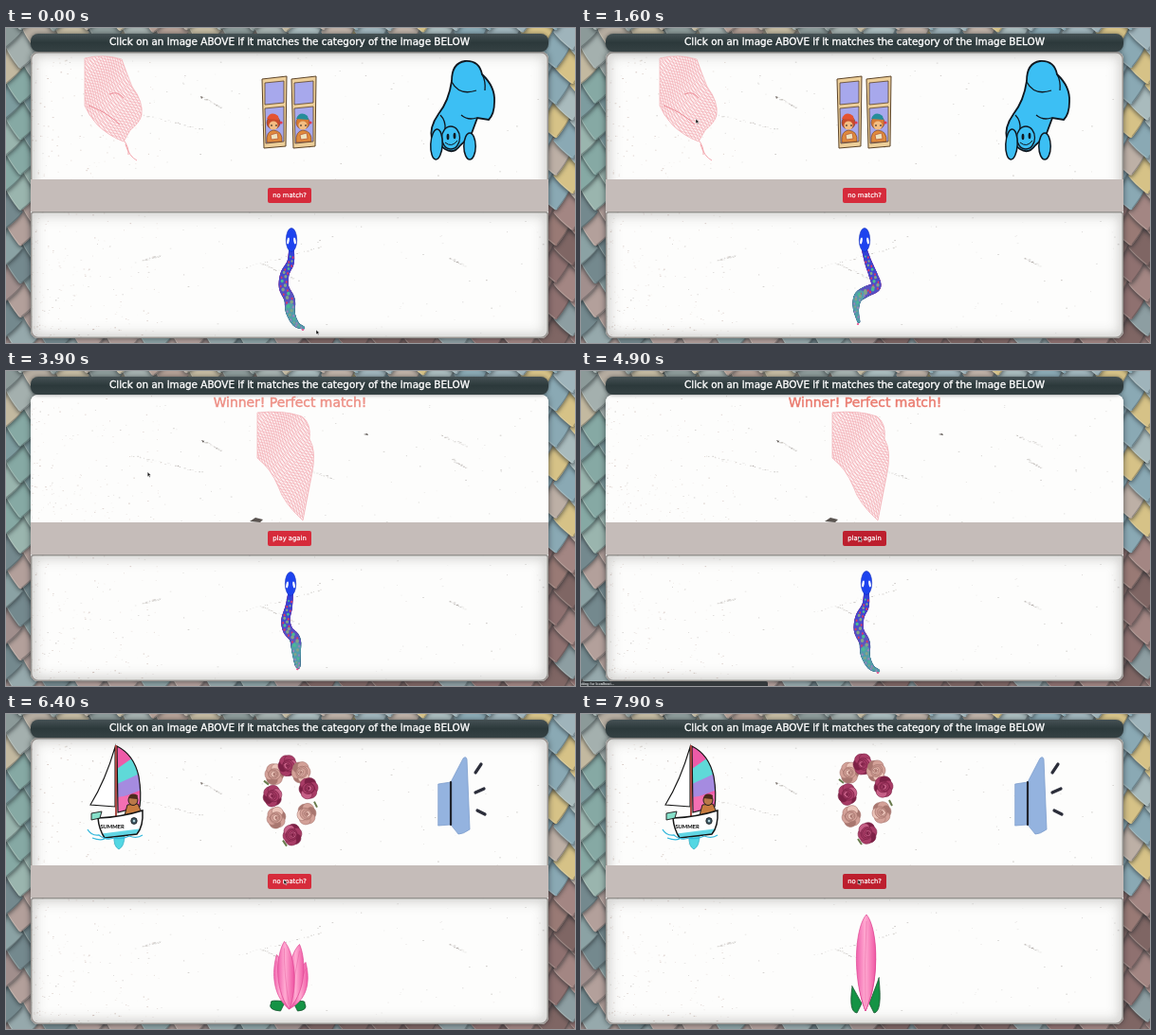
These frames come from a looping animation (600x333 px, 8000 ms). An HTML page with a canvas:

```html
<!DOCTYPE html>
<html lang="en">
<head>
<meta charset="utf-8">
<title>Matching game</title>
<style>
html, body { margin: 0; width: 100%; height: 100%; overflow: hidden; background: #8b9698; }
canvas { display: block; width: 600px; height: 333px; }
</style>
</head>
<body>
<canvas id="stage" width="600" height="333"></canvas>
<script>
const LOOP = 8000, WIN = 2000, LOAD = 5150;
const stage = document.getElementById('stage').getContext('2d');
let c = stage;

const lerp = (a, b, k) => a + (b - a) * k;
const mix = (a, b, k) => a.map((v, i) => lerp(v, b[i], k));

// Interpolates rows of [time, ...values].
function track(t, rows) {
  if (t <= rows[0][0]) return rows[0].slice(1);
  for (let i = 1; i < rows.length; i++) {
    const a = rows[i - 1], b = rows[i];
    if (t <= b[0]) return mix(a, b, (t - a[0]) / (b[0] - a[0])).slice(1);
  }
  return rows[rows.length - 1].slice(1);
}

function seeded(s) {
  return () => (s = (s * 16807) % 2147483647) / 2147483647;
}

// Entrance from far away with a damped overshoot; returns the offset.
function bounceIn(t, start) {
  const p = (t - start) / 1000;
  const stops = [[0, -3000], [.6, 25], [.75, -10], [.9, 5], [1, 0]];
  if (p <= 0) return -3000;
  for (let i = 1; i < stops.length; i++) {
    const [p0, a] = stops[i - 1], [p1, b] = stops[i];
    if (p <= p1) return lerp(a, b, 1 - (1 - (p - p0) / (p1 - p0)) ** 3);
  }
  return 0;
}

function draw(d, fill, stroke, width = 1) {
  const p = d instanceof Path2D ? d : new Path2D(d);
  if (fill) { c.fillStyle = fill; c.fill(p); }
  if (stroke) { c.strokeStyle = stroke; c.lineWidth = width; c.stroke(p); }
}

function oval(x, y, rx, ry, fill, stroke, width, turn = 0) {
  const p = new Path2D();
  p.ellipse(x, y, rx, ry, turn, 0, 7);
  draw(p, fill, stroke, width);
}

function box(x, y, w, h, r) {
  const p = new Path2D();
  p.roundRect(x, y, w, h, r);
  return p;
}

// The hairline stroke gives the text a medium weight.
function label(text, x, y, size, color, font = '"DejaVu Sans", sans-serif', align = 'center') {
  c.font = size + 'px ' + font;
  c.textAlign = align;
  c.textBaseline = 'middle';
  c.fillStyle = c.strokeStyle = color;
  c.lineWidth = size * .035;
  c.fillText(text, x, y);
  c.strokeText(text, x, y);
}

function shifted(x, y, paint) {
  c.save();
  c.translate(x, y);
  paint();
  c.restore();
}

function shingles() {
  const rnd = seeded(77);
  const sand = ['#b5aca0', '#8c9a99', '#c3b9a0', '#a4b0ae', '#b39f95'];
  const teal = ['#86a9a4', '#9ab5ae', '#c4bf9f', '#7d9c9f', '#a9b3a6'];
  const mauve = ['#a18f8d', '#8ba2a4', '#b3a09b', '#74898e', '#96a9ac'];
  const sky = ['#9fb4bb', '#8aa9b4', '#d6c287', '#a9bbbd', '#bdb0a6'];
  const brick = ['#8f7170', '#a38683', '#7f6664', '#8d9ea2', '#997a75'];
  for (let row = 20; row >= -1; row--) {
    for (let col = -1; col < 19; col++) {
      const x = col * 35 + (row % 2 ? 17.5 : 0), y = row * 19 + rnd() * 3;
      const tones = x < 300 ? (y < 50 ? sand : y < 190 ? teal : mauve) : y < 190 ? sky : brick;
      c.save();
      c.translate(x, y);
      c.rotate(x < 300 ? .12 : -.12);
      c.shadowColor = 'rgba(30,36,40,.6)';
      c.shadowBlur = 4;
      c.shadowOffsetY = 2;
      draw('M-18 0L0-22L18 0Q13 9 2 20Q0 22-2 20Q-13 9-18 0Z', tones[rnd() * 5 | 0]);
      c.shadowColor = 'transparent';
      draw('M-17 1Q-12 9-1 20', null, 'rgba(235,235,225,.25)', 1);
      draw('M17 1Q12 9 1 20', null, 'rgba(50,55,58,.35)', 1);
      c.restore();
    }
  }
}

function scuffs(x, y, w, h, seed, count) {
  const rnd = seeded(seed);
  for (let i = 0; i < count; i++) {
    const worn = rnd() < .6;
    const px = x + (worn ? rnd() ** 2 * .25 : rnd()) * w;
    const py = y + (worn ? 1 - rnd() ** 1.6 : rnd()) * h;
    c.fillStyle = `rgba(${worn ? '160,125,112' : '120,112,106'},${.1 + rnd() * .35})`;
    c.fillRect(px, py, .4 + rnd() * 1.4, .3 + rnd() * .7);
  }
}

// A broken scratch: short dashes scattered along a line.
function scratch(x, y, dx, dy) {
  const rnd = seeded(Math.round(x * 7 + y));
  for (let k = 0; k < 1; k += .04) {
    c.fillStyle = `rgba(115,106,100,${rnd() * .55})`;
    c.fillRect(x + dx * k + rnd() * 2, y + dy * k + rnd() * 2 - 1, .6 + rnd() * 1.8, .7);
  }
}

function panel(shape, paint, inset) {
  c.save();
  draw(shape, '#fdfdfc');
  c.clip(shape);
  paint();
  if (inset) {
    c.shadowColor = 'rgba(80,76,72,.85)';
    c.shadowBlur = 14;
    draw(shape, null, 'rgba(140,136,132,.75)', 3);
    c.shadowBlur = 8;
    draw(shape, null, 'rgba(140,136,132,.4)', 2);
  }
  c.restore();
}

function backdrop(won) {
  const canvas = document.createElement('canvas');
  canvas.width = 600;
  canvas.height = 333;
  c = canvas.getContext('2d');
  shingles();
  c.save();
  c.shadowColor = 'rgba(30,35,38,.6)';
  c.shadowBlur = 6;
  draw(box(26, 25, 546, 303, 8), '#fdfdfc');
  c.restore();
  panel(box(26, 25, 546, 172, 8), () => {
    scuffs(26, 25, 546, 168, won ? 51 : 23, won ? 420 : 340);
    scratch(127, 88, 82, 20);
    scratch(206, 73, 20, 12);
    scratch(468, 93, 17, 10);
    if (won) {
      scratch(455, 66, 30, 14);
      scratch(310, 102, 34, 12);
      draw('M257 159L263 155L271 157L268 160ZM206 73l3 1l-1 2zM377 67l4-1l1 2z', '#5a5450');
    } else {
      draw('M205 72l3 1l-2 2zM150 81l3 1z', '#7c746e');
    }
  }, !won);
  draw('M26 160H572V194H26Z', 'rgb(197,188,185)');
  panel(box(26, 194, 546, 134, [3, 3, 8, 8]), () => {
    scuffs(26, 194, 546, 134, 91, 320);
    scratch(142, 246, 20, -6);
    scratch(240, 256, 95, -26);
    scratch(268, 248, 36, 18);
    scratch(466, 243, 17, 8);
  }, true);
  c = stage;
  return canvas;
}

const plain = backdrop(false), prize = backdrop(true);

function header(dy) {
  const fill = c.createLinearGradient(0, 6 + dy, 0, 25 + dy);
  fill.addColorStop(0, '#455154');
  fill.addColorStop(.5, '#2c393b');
  fill.addColorStop(1, '#354143');
  c.save();
  c.shadowColor = 'rgba(20,25,28,.5)';
  c.shadowBlur = 4;
  draw(box(26, 6 + dy, 546, 19, 8), fill);
  c.restore();
  label('Click on an image ABOVE if it matches the category of the image BELOW', 299, 15.6 + dy, 10.4, '#fff');
}

function button(text, hover) {
  draw(box(276, 169, 46, 16, 2), hover ? '#bd1f2e' : '#d62b3b');
  label(text, 299, 177.3, 6.8, '#fff');
}

const serpentA = new Path2D('M83 32Q103 27 122 33Q128 50 133 62Q145 78 143 92Q141 100 131 108L124 120Q108 114 96 102Q87 92 83 82Z');
const serpentB = new Path2D('M265 44Q292 41 312 48Q322 55 320 72Q328 84 322 112L313 158Q293 140 287 122Q280 104 265 92Z');

function serpent(shape, x, y) {
  c.save();
  draw(shape, '#fdeeef', '#f2b0b7', .7);
  c.clip(shape);
  for (let i = -22; i < 42; i++) {
    const a = new Path2D(), b = new Path2D();
    for (let j = 0; j <= 24; j++) {
      const wave = Math.sin(j * .45 + i * .25) * 2.5;
      a.lineTo(x + i * 3 + j * 2.2 + wave, y + j * 5);
      b.lineTo(x + j * 3, y + i * 3.4 + j * 1.6 + wave);
    }
    draw(a, null, '#f1a7af', .7);
    draw(b, null, '#f3b0b7', .7);
  }
  c.restore();
}

function pinkHead() {
  draw('M123 117Q130 126 129 134M126 123Q130 136 138 140', null, '#f3a6ad', 1);
  serpent(serpentA, 83, 30);
  draw('M87 82Q105 88 120 102M109 70Q118 66 124 74', null, '#ec8f9a', 1);
}

function shutter(x, hair, cap) {
  shifted(x, 51, () => {
    draw('M0 3L26 0L25 74L2 76Z', '#edcf9a', '#5c4327', 1);
    draw('M3 7L23 5V28L3 30Z', '#a7a8ec', '#5c4327', .8);
    draw('M3 34L23 32V69L4 71Z', '#a7a8ec', '#5c4327', .8);
    draw('M5 70Q4 58 12 57Q22 58 21 69Z', '#df8a3d', '#6d3a1c', .6);
    oval(12, 49, 7, 7, hair, '#6d3a1c', .6);
    oval(12, 52, 4.6, 4.5, '#f3bd83');
    draw('M5 45Q9 36 17 42L18 46Z', cap);
    oval(10, 52, .7, 1, '#222');
    oval(15, 52, .7, 1, '#222');
    draw('M9 62L16 60L17 66L10 67Z', '#eee3bf', '#b5502d', .7);
    oval(20, 49, 1.6, 1.6, '#df3c51');
  });
}

function blueBeast() {
  const blue = '#3cbff4', ink = '#101820';
  draw('M470 56Q470 37 484 35Q499 34 502 49Q516 62 515 78Q515 91 509 97L497 95L490 114L479 124Q472 134 463 128L449 118Q446 105 456 91Q467 77 470 56Z', blue, ink, 1.8);
  draw('M470 57Q478 72 496 66M502 49Q506 56 505 66M480 92Q487 98 496 95M458 92Q464 98 463 108', null, ink, 1.3);
  oval(469, 116, 9.5, 12, blue, ink, 1.3);
  oval(454, 123, 6.2, 16, blue, ink, 1.5, .05);
  oval(489, 125, 6.2, 14, blue, ink, 1.5);
  oval(466, 115, 1.4, 3.2, ink);
  oval(473, 114, 1.4, 3.2, ink);
  draw('M463 121Q470 127 476 119', null, ink, 1);
}

function boat() {
  const ink = '#151515';
  draw('M114 128L125 128Q125 140 119 143Q113 140 114 128Z', '#53d7e3', '#2aa8c0', .7);
  draw('M115 35Q105 70 89 96L115 98Z', '#fff', ink, 1.1);
  const sail = new Path2D('M117 34Q135 43 140 66Q143 84 141 98L118 104Z');
  draw(sail, '#ee5ba8');
  c.save();
  c.clip(sail);
  draw('M117 58L134 46L143 62L117 76Z', '#5fd9d8');
  draw('M117 74L143 62V80L117 90Z', '#a58be0');
  draw('M117 88L143 84V92L117 104Z', '#f46fb2');
  c.restore();
  draw(sail, null, ink, 1.2);
  draw('M116 33V108', null, '#a63b35', 1.8);
  draw('M125 107L128 96L139 95L143 104Z', '#c87c3f', ink, .9);
  oval(134, 91, 5, 5.5, '#b97948', ink, .9);
  draw('M129 89Q131 82 139 86L138 90Z', '#4c2b1b');
  const hull = new Path2D('M97 110Q122 109 144 102Q145 119 138 127L104 131Q98 122 97 110Z');
  draw(hull, '#fff');
  c.save();
  c.clip(hull);
  draw('M96 127L145 121V134H96Z', '#62d6e4');
  c.restore();
  draw(hull, null, ink, 1.5);
  draw('M90 105L101 103L99 110L90 112Z', '#86dfc9', ink, .9);
  label('SUMMER', 112, 119.5, 5.8, '#111', 'Lato, sans-serif');
  oval(135, 113, 3.2, 3.4, '#415b68', ink, .8);
  oval(135, 113, 1.2, 1.2, '#b9d7dd');
  draw('M86 122Q90 129 98 128Q105 134 114 131Q122 133 130 129Q138 132 144 128M91 131Q99 134 104 132', null, '#35b8dc', 1.3);
}

function rose(x, y, dark, i) {
  const tones = dark ? ['#7c2146', '#a83c66', '#c65f86'] : ['#a8766f', '#d3a198', '#ecc5ba'];
  for (let k = 0; k < 6; k++) {
    const a = k * 1.05 + i;
    oval(x + Math.cos(a) * 5, y + Math.sin(a) * 6.5, 5, 6, tones[k % 2 + (k > 3)], tones[0], .6, a);
  }
  for (let r = 6.5; r > 1; r -= 1.5) {
    oval(x + Math.sin(r + i), y, r, r * .9, tones[r * 2 % 4 > 2 ? 2 : 1], tones[0], .8, i);
  }
  oval(x, y, 1.2, 1, tones[0]);
}

function wreath() {
  const spots = [[283, 62], [297, 53], [311, 60], [319, 77], [317, 104], [302, 126], [285, 108], [281, 85]];
  draw('M272 69L277 73M325 91L328 97M292 132L296 138', null, '#697b4d', 2);
  spots.forEach(([x, y], i) => rose(x, y, i % 2, i));
}

function horn() {
  c.lineCap = 'round';
  draw('M458 74L471 72L484 47Q487 44 488 48L491 122Q484 127 479 127L471 117L458 118Z', '#94b3df', '#7f9fcd', .8);
  draw('M471 72V117', null, '#20232d', 2.2);
  draw('M497 62L503 53M497 83L506 79M499 102L507 106', null, '#2c2e3a', 3.2);
  c.lineCap = 'butt';
}

// Spine points from neck to tail tip.
const poses = [
  [0, 301, 235, 300, 248, 294, 260, 293, 274, 299, 287, 300, 301, 306, 313, 314, 317],
  [1600, 299, 235, 303, 248, 308, 261, 311, 273, 300, 279, 292, 285, 290, 297, 293, 311],
  [2800, 299, 237, 296, 252, 296, 266, 302, 274, 311, 279, 313, 293, 309, 306, 302, 309],
  [4900, 301, 235, 300, 248, 294, 260, 293, 274, 299, 287, 300, 301, 306, 313, 314, 317]
];

function snake(t) {
  const v = track(t, poses);
  const at = i => { i = Math.max(0, Math.min(7, i)); return [v[i * 2], v[i * 2 + 1]]; };
  const spine = k => {
    const i = Math.min(6, Math.floor(k * 7)), f = k * 7 - i;
    const [a, b, d, e] = [at(i - 1), at(i), at(i + 1), at(i + 2)];
    return [0, 1].map(n => b[n] + .5 * f * (d[n] - a[n] + f * (2 * a[n] - 5 * b[n] + 4 * d[n] - e[n] + f * (3 * (b[n] - d[n]) + e[n] - a[n]))));
  };
  const girth = k => (2.3 + 2.9 * Math.sin(Math.min(1, k * 1.5) * Math.PI / 2)) * Math.min(1, (1.08 - k) * 2.2);
  const coat = k => `rgb(${mix([46, 63, 218], k < .65 ? [98, 86, 190] : [84, 157, 170], Math.min(1, k * 1.5)).map(Math.round)})`;
  for (let k = 0; k <= 1; k += .008) oval(...spine(k), girth(k) + .5, girth(k) + .5, k < .55 ? '#733da6' : '#3f7190');
  for (let k = 0; k <= 1; k += .008) oval(...spine(k), girth(k), girth(k), coat(k));
  for (let i = 0; i < 19; i++) {
    const k = .08 + i * .047, [x, y] = spine(k), g = girth(k), side = i % 2 ? 1 : -1;
    oval(x + side * g * .35, y, g * .35, g * .4, i % 3 ? '#83a488' : '#4abb92');
    oval(x - side * g * .65, y + 1, .9, 1.3, k < .6 ? '#df3762' : '#9d82bd');
  }
  const [tx, ty] = spine(1);
  oval(tx - 1, ty + 2, 1.2, 1, '#e9508f');
  const [hx, hy] = at(0);
  oval(hx, hy - 11, 5.7, 12.5, '#1d43ef', '#152fba', .6);
  oval(hx - 3.5, hy - 10, 1.2, 3.5, '#fff', null, 0, .15);
  oval(hx + 3.5, hy - 10, 1.2, 3.5, '#fff', null, 0, -.15);
}

// Each petal row is tip x, tip y and half width; the last six values place base and leaves.
const blooms = [
  [5900, 286, 261, 7, 315, 263, 7, 307, 249, 8, 296, 247, 9, 299, 307, 281, 298, 314, 303],
  [6900, 285, 248, 7, 317, 262, 8, 312, 238, 8, 291, 234, 8, 298, 317, 278, 313, 316, 309],
  [7900, 300, 222, 8, 302, 224, 9, 302, 215, 9, 301, 212, 10, 300, 314, 286, 288, 314, 279]
];

function flower(t) {
  const v = track(t, blooms), [bx, by, lx, ly, rx, ry] = v.slice(12);
  for (const [x, y, s] of [[lx, ly, -1], [rx, ry, 1]]) {
    draw(`M${bx + s * 4} ${by - 8}Q${x + s * 2} ${y - 4} ${x} ${y}Q${x + s * 4} ${by + 1} ${bx + s * 9} ${by + 2}Z`, '#159345', '#17532f', .8);
  }
  for (let i = 0; i < 12; i += 3) {
    const [x, y, w] = v.slice(i, i + 3), mid = lerp(y, by, .5), cx = lerp(x, bx, .3);
    const fill = c.createLinearGradient(cx - w, 0, cx + w, 0);
    fill.addColorStop(0, '#f062ad');
    fill.addColorStop(.45, '#ffaad1');
    fill.addColorStop(1, '#f058a5');
    draw(`M${bx} ${by}C${cx - w * 1.6} ${mid + 12} ${cx - w * 1.1} ${y + 12} ${x} ${y}C${cx + w * 1.1} ${y + 12} ${cx + w * 1.6} ${mid + 12} ${bx} ${by}Z`, fill, '#de4793', .7);
    draw(`M${x} ${y + 7}Q${cx - 2} ${mid} ${bx} ${by - 5}`, null, 'rgba(210,48,129,.35)', .8);
  }
}

const cursorPath = [
  [0, 327, 319], [300, 327, 319], [1400, 121, 96], [1800, 121, 96], [2600, 131, 98],
  [3800, 131, 98], [4700, 293, 175], [7000, 293, 175], [7800, 292, 175]
];

function cursor(t) {
  const [x, y] = track(t, cursorPath);
  shifted(x, y, () => draw('M0 0V5L1.2 4L2.1 5.8L3 5.3L2.2 3.6H3.8Z', '#111', '#fff', .5));
}

function frame(now) {
  const t = now % LOOP, won = t >= WIN && t < LOAD;
  c.drawImage(won ? prize : plain, 0, 0);
  header(t >= LOAD ? bounceIn(t, LOAD) : 0);
  if (t < WIN) {
    pinkHead();
    shutter(270, '#c94c2b', '#e45332');
    shutter(301, '#d67b35', '#268d9a');
    blueBeast();
  } else if (won) {
    c.globalAlpha = track(t, [[2000, .45], [2800, .55], [4900, 1]])[0];
    label('Winner! Perfect match!', 299.5, 34, 13.9, '#ea7c70');
    c.globalAlpha = 1;
    serpent(serpentB, 265, 42);
  } else {
    shifted(bounceIn(t, 5270), 0, boat);
    shifted(0, bounceIn(t, 5470), wreath);
    shifted(track(t, [[6900, 3], [7900, 0]])[0] - bounceIn(t, 5520), 0, horn);
  }
  button(won ? 'play again' : 'no match?', t >= 4700 && t < LOAD || t > 7300);
  if (t < LOAD) snake(t); else flower(t);
  if (t >= 4800 && t < LOAD) {
    draw(box(-3, 328, 200, 8, 2), '#34393c');
    label('Waiting for localhost...', -5, 331, 4, '#ccd0d2', 'Roboto, sans-serif', 'left');
  }
  cursor(t);
}

const begin = performance.now();
function tick() {
  frame(performance.now() - begin);
  requestAnimationFrame(tick);
}
tick();
</script>
</body>
</html>
```
